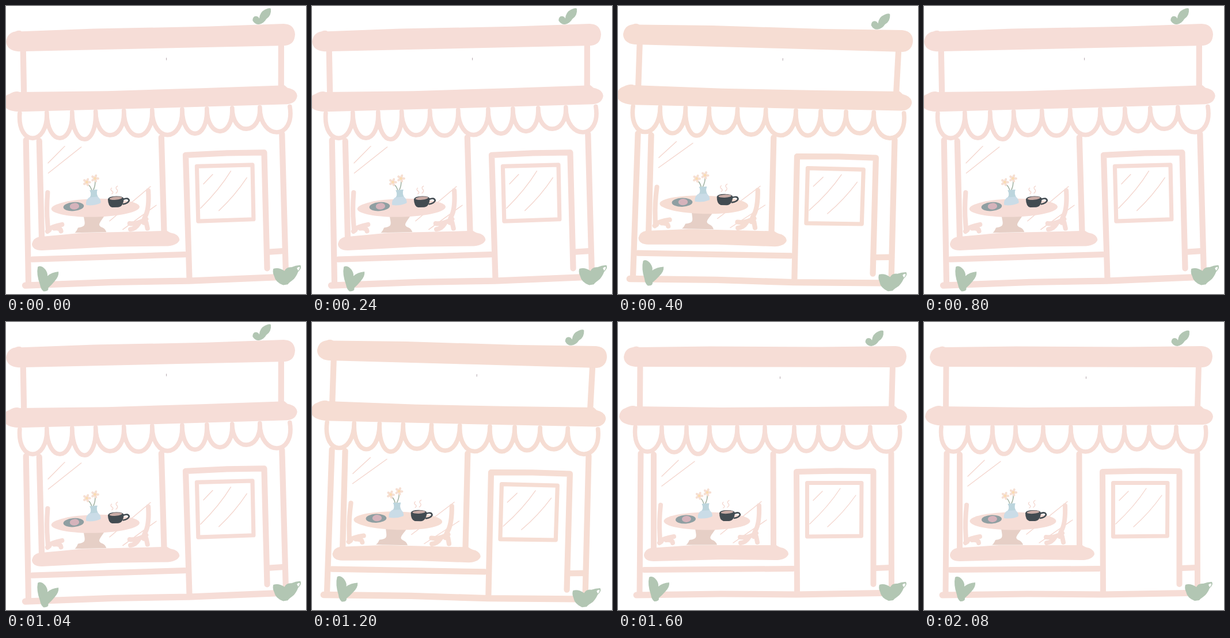
Animation, 521 px wide and 502 px high, one loop 2400 ms. Source, as an HTML page:

```html
<!DOCTYPE html>
<html lang="en">
<head>
<meta charset="utf-8">
<title>Wobbling café</title>
<style>
html, body { margin: 0; width: 100%; height: 100%; overflow: hidden; background: #fff; }
svg { display: block; width: 521px; height: 502px; }
.line { fill: none; stroke: var(--pink); stroke-width: 10; stroke-linecap: round; stroke-linejoin: round; }
.fill { fill: var(--pink); }
.thin { fill: none; stroke: #f4d5cd; stroke-width: 1.3; stroke-linecap: round; }
.leaf { fill: #b2c6b3; }
</style>
</head>
<body>
<svg viewBox="0 0 521 502">
<g id="shop">
  <!-- walls and frames -->
  <g class="line">
    <path d="M38.500 76L38 150M477 76L475 150"/>
    <path d="M39.500 229L37.500 474M62 231L62 394M269.500 230L270 390M474.500 229L475 470"/>
    <path d="M45 432L304 430M448 429L474 428"/>
    <path stroke-width="11" d="M32 476L180 474L310 475L485 472"/>
    <path d="M311 470L310 261L380 259.500L443.500 260L443.500 457"/>
    <path style="stroke-width:7" d="M328.500 280.500L423 280.500L422.500 373L328.500 374Z"/>
    <path id="awning" style="stroke-width:7.500"/>
  </g>
  <!-- roof bars and sill -->
  <g class="fill">
    <path d="M26 44Q32 41 37 44L160 42.500L350 43.500L482 42Q500 43 501 60Q500 78 484 79L280 78.500L30 78Q11 76 10 61Q12 46 26 44Z"/>
    <path d="M13 150Q24 144 31 147L180 149L340 148L481 146.500L486 151Q501 154 502 165Q500 178 484 179L270 180L30 180.500Q4 179 2 165Q3 153 13 150Z"/>
    <path d="M57 394Q100 391 130 389L275 389Q280 393 287 394Q296 398 296 405Q292 414 276 415L180 414L62 417Q46 417 45 406Q47 396 57 394Z"/>
  </g>
  <path class="thin" d="M76 269L105 241M76 286L133 243M178 370L249 313M200 385L258 345"/>
  <path class="thin" d="M339 311L355 295M333 352Q366 321 386 290M364 357Q392 332 413 302"/>
  <!-- chairs -->
  <g class="line" style="stroke-width:8">
    <path d="M74 319Q71 348 72.500 370L73 382Q80 377 97 374M84 380Q94 379 95 385M75 383L72 385"/>
    <path d="M245 320Q246 348 240 361Q235 370 236 374M212 375Q226 377 240 368M227 376Q222 384 213 385M240 374L242 384"/>
  </g>
  <!-- table -->
  <path fill="#e6cfc6" d="M134 360C136 374 139 378 124 380Q121 387 118 388.500H172Q170 382 164 380C156 376 163 371 170 360Z"/>
  <ellipse class="fill" cx="154.500" cy="347" rx="75" ry="15.500"/>
  <g transform="rotate(-3 117 344)">
    <ellipse cx="117.500" cy="344" rx="17.500" ry="7.500" fill="#8f9fa2"/>
    <ellipse cx="119" cy="343.500" rx="8" ry="5.500" fill="#d5b3bb"/>
  </g>
  <!-- vase -->
  <path fill="none" stroke="#a4b5a5" stroke-width="1.600" d="M149 318Q148 311 143 307M151 318Q156 309 155 300"/>
  <path fill="#cadce7" d="M145.500 317L158.500 316Q156 324 160 329Q165 334 163.500 339Q152 344 139 342Q137 333 146 328Q149 323 145.500 317Z"/>
  <path fill="#bcd5dd" d="M145.500 317L158.500 316Q156 323 159 328L146 329Q149 323 145.500 317Z"/>
  <g id="flowers"></g>
  <!-- mug -->
  <path fill="none" stroke="#424b51" stroke-width="2.600" d="M201 334Q211 330 212 336Q210 341 201 342"/>
  <path fill="#424b51" d="M176 333Q177 328 190 328Q203 328 203 333Q202 346 193 347H183Q176 345 176 333Z"/>
  <ellipse cx="189.500" cy="331.500" rx="11" ry="2.600" fill="#c9aca6" transform="rotate(-4 189 331)"/>
  <path class="thin" stroke="#efc4bc" d="M183 324Q187 321 183 319Q180 316 183 314M190 323Q195 319 191 316Q189 313 193 311"/>
  <path fill="#b5a8ae" d="M281 95h1v4h-1z"/>
  <!-- leaves -->
  <path class="leaf" d="M440 42Q433 42 429.500 35Q430 28 435 28Q439 28 441 32Q442 21 451 17Q459 13 461 16Q462 28 453 33Q448 41 440 42Z"/>
  <path class="leaf" d="M63 487Q58 483 57 475Q51 458 54 445Q60 441 67 450Q71 456 70 461Q77 455 89 454Q90 462 82 470Q76 477 71 481Q72 487 63 487Z"/>
  <path class="leaf" fill-rule="evenodd" d="M470 486Q457 481 455 470Q452 464 454 458Q463 455 473 462Q476 455 485 456Q493 453 500 453Q503 458 496 464Q492 474 485 479Q479 483 478 485ZM494 458Q497 455 499 456Q499 460 496 462Z"/>
</g>
</svg>
<script>
const shop = document.getElementById("shop");

// Awning: points where the scallops meet, and how low each one hangs.
const joins = [30, 76, 119, 159, 207, 255, 306, 348, 391, 438, 489];
const lows = [226, 227, 230, 224, 226, 226, 225, 222, 219, 226];
const scallops = lows.map((low, i) => {
  const a = joins[i], b = joins[i + 1];
  const dip = 183 + (low - 183) / 0.75;
  const left = i === 0 ? a - 6 : a - 1;
  const right = i === lows.length - 1 ? b + 8 : b + 1;
  return `M${a} 183C${left} ${dip} ${right} ${dip} ${b} 183`;
});
document.getElementById("awning").setAttribute("d", scallops.join(""));

function flower(x, y) {
  let petals = "";
  for (let i = 0; i < 5; i++) {
    petals += `<ellipse cx="${x}" cy="${y - 4}" rx="2.1" ry="3.2" fill="#f6dfd3" transform="rotate(${i * 72 + 20} ${x} ${y})"/>`;
  }
  return petals + `<circle cx="${x}" cy="${y}" r="2.2" fill="#fbdcb0"/>`;
}
document.getElementById("flowers").innerHTML = flower(141, 303) + flower(155, 297);

const tiltLeft = { matrix: "1.022 -.025 .026 1.025 -11.6 0", pink: "#f6ddd7" };
const tiltRight = { matrix: "1.025 .026 -.027 1.026 .3 -13.7", pink: "#f6ddd3" };
const level = { matrix: "1 0 0 1 0 0", pink: "#f6ddd6" };
const poses = [tiltLeft, tiltRight, tiltLeft, tiltRight, level, level];
const STEP = 400;

function draw(ms) {
  const pose = poses[Math.floor(ms / STEP) % poses.length];
  shop.setAttribute("transform", `matrix(${pose.matrix})`);
  shop.style.setProperty("--pink", pose.pink);
}

function tick() {
  draw(performance.now());
  requestAnimationFrame(tick);
}
tick();
</script>
</body>
</html>
```
